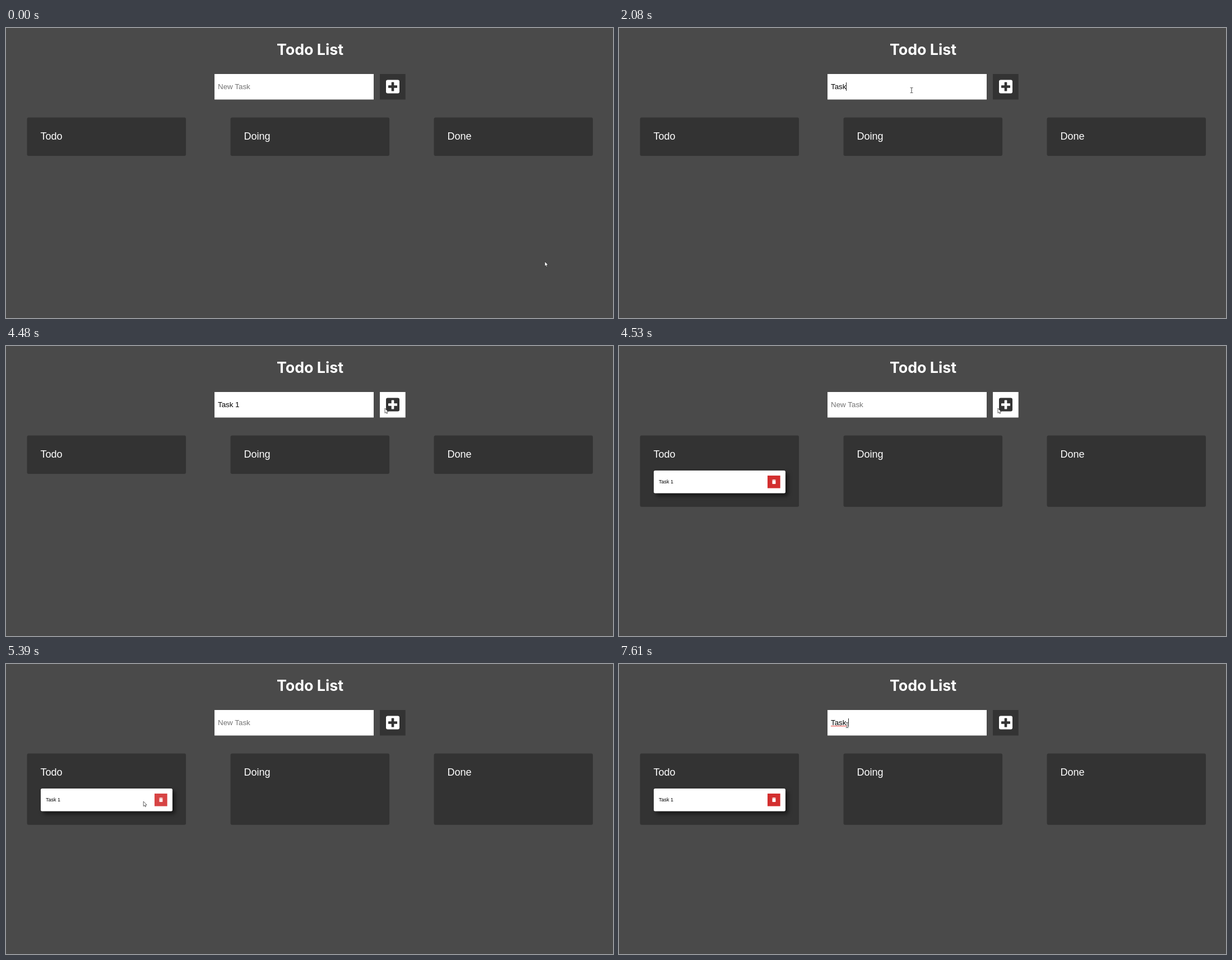
Recreate the animation shown at these times as an HTML page with a canvas. Size 1083x517 px, loop 8000 ms.

```html
<!DOCTYPE html>
<html lang="en">
<head>
<meta charset="utf-8">
<title>Todo List</title>
<style>
  html, body { margin: 0; width: 100%; height: 100%; overflow: hidden; background: #4a4a4a; }
  canvas { display: block; }
</style>
</head>
<body>
<canvas id="stage" width="1083" height="517"></canvas>
<script>
const ctx = document.getElementById('stage').getContext('2d');
const LOOP = 8000, BLINK = 495, ADDED = 4530;
const SANS = '"Liberation Sans", Arial, sans-serif';
const DARK = [51, 51, 51], WHITE = [255, 255, 255], RED = [211, 47, 47];

const home = { x: 968, y: 420 };
const moves = [
  { from: 0, to: 190, x: 538, y: 182 },
  { from: 320, to: 740, x: 522, y: 111 },
  { from: 3680, to: 3880, x: 592, y: 89 },
  { from: 3880, to: 4480, x: 676, y: 111 },
  { from: 4740, to: 4860, x: 451, y: 241 },
  { from: 4860, to: 5540, x: 243, y: 245 },
  { from: 5720, to: 6240, x: 407, y: 109 }
];

// Each visit to the input: focus, key strokes, blur
const visits = [
  { focus: 675, keys: [1250, 1830, 1910, 2080, 2490, 2900], blur: 4440, clear: ADDED },
  { focus: 6105, keys: [6750, 7110, 7230, 7480, 7610], blur: LOOP, clear: LOOP }
];

const mix = (a, b, k) => `rgb(${a.map((v, i) => Math.round(v + (b[i] - v) * k))})`;
const clamp = k => Math.min(1, Math.max(0, k));
const easeOut = k => 1 - (1 - clamp(k)) ** 3;
const fade = (t, enter, leave) => easeOut((t - enter) / 340) - easeOut((t - leave) / 340);

function pointer(t) {
  let { x, y } = home;
  for (const m of moves) {
    const k = easeOut((t - m.from) / (m.to - m.from));
    x += (m.x - x) * k;
    y += (m.y - y) * k;
  }
  return [x, y];
}

function rect(x, y, w, h, fill, r = 0) {
  ctx.fillStyle = fill;
  ctx.beginPath();
  ctx.roundRect(x, y, w, h, r);
  ctx.fill();
}

function text(s, x, y, font, fill, align = 'left') {
  ctx.font = font;
  ctx.fillStyle = fill;
  ctx.textAlign = align;
  ctx.fillText(s, x, y);
}

function drawInput(t) {
  rect(372, 82, 284, 45.6, '#fff');
  const visit = visits.find(v => t >= v.focus && t < v.clear);
  const hits = visit ? visit.keys.filter(k => k <= t) : [];
  const value = 'Task 1'.slice(0, hits.length);
  text(value || 'New Task', 378, 109, '13.333px ' + SANS, value ? '#000' : '#757575');
  if (!visit || t >= visit.blur) return;

  if (value.includes(' ')) {
    ctx.strokeStyle = '#e53935';
    ctx.lineWidth = 0.9;
    ctx.beginPath();
    for (let x = 378; x <= 406; x++) ctx.lineTo(x, 110.6 + (x % 2 ? 0.6 : -0.6));
    ctx.stroke();
  }
  const idle = t - (hits.pop() || visit.focus);
  if (idle % (2 * BLINK) < BLINK) {
    rect(Math.floor(378 + ctx.measureText(value).width), 97, 1, 15, '#222');
  }
}

function drawAddButton(t) {
  const k = fade(t, 4150, 4745);
  const back = mix(DARK, WHITE, k);
  rect(667, 82, 45.7, 45.6, back);
  rect(678, 92.5, 24, 24, mix(WHITE, DARK, k), 3);
  rect(682, 102.2, 16, 4.6, back, 0.6);
  rect(687.7, 96.5, 4.6, 16, back, 0.6);
}

function drawCard(t) {
  ctx.save();
  ctx.shadowColor = 'rgba(0,0,0,.55)';
  ctx.shadowBlur = 7;
  ctx.shadowOffsetX = ctx.shadowOffsetY = 4.5;
  rect(62, 222, 235, 40.5, '#fff', 2.5);
  ctx.restore();
  text('Task 1', 71, 245, '9px ' + SANS, '#000');

  const k = fade(t, 5130, 5215);
  const icon = mix(WHITE, RED, k);
  rect(265, 231, 22.7, 22.5, mix(RED, WHITE, k));
  rect(275, 238, 3, 1.2, icon, 0.4);
  rect(273, 238.5, 7, 1.1, icon, 0.3);
  rect(273.5, 240, 6, 6, icon, 0.8);
}

function drawArrow(x, y) {
  const shape = new Path2D('M0 0V8.6L1.9 6.9 3.2 9.7 4.6 9.1 3.4 6.4 6 6.2Z');
  ctx.save();
  ctx.translate(x, y);
  ctx.fillStyle = '#fff';
  ctx.strokeStyle = '#222';
  ctx.lineWidth = 0.7;
  ctx.fill(shape);
  ctx.stroke(shape);
  ctx.restore();
}

function drawBeam(x, y) {
  x = Math.round(x);
  y = Math.round(y);
  rect(x - 0.5, y - 5, 1, 10, '#444');
  rect(x - 2.5, y - 5, 5, 1, '#666');
  rect(x - 2.5, y + 4, 5, 1, '#666');
}

function draw(t) {
  rect(0, 0, 1083, 517, '#4a4a4a');
  text('Todo List', 542.5, 48, '700 26.8px Inter, sans-serif', '#fff', 'center');
  drawInput(t);
  drawAddButton(t);

  const added = t >= ADDED;
  ['Todo', 'Doing', 'Done'].forEach((name, i) => {
    const x = 37.5 + 363 * i;
    rect(x, 159.5, 283.6, added ? 127.3 : 68.4, '#333', 3);
    text(name, x + 24, 199, '18px ' + SANS, '#fff');
  });
  if (added) drawCard(t);

  const [x, y] = pointer(t);
  const overInput = x > 372 && x < 656 && y > 82 && y < 128;
  (overInput ? drawBeam : drawArrow)(x, y);
}

const start = performance.now();
function tick() {
  draw((performance.now() - start) % LOOP);
  requestAnimationFrame(tick);
}
tick();
</script>
</body>
</html>
```
